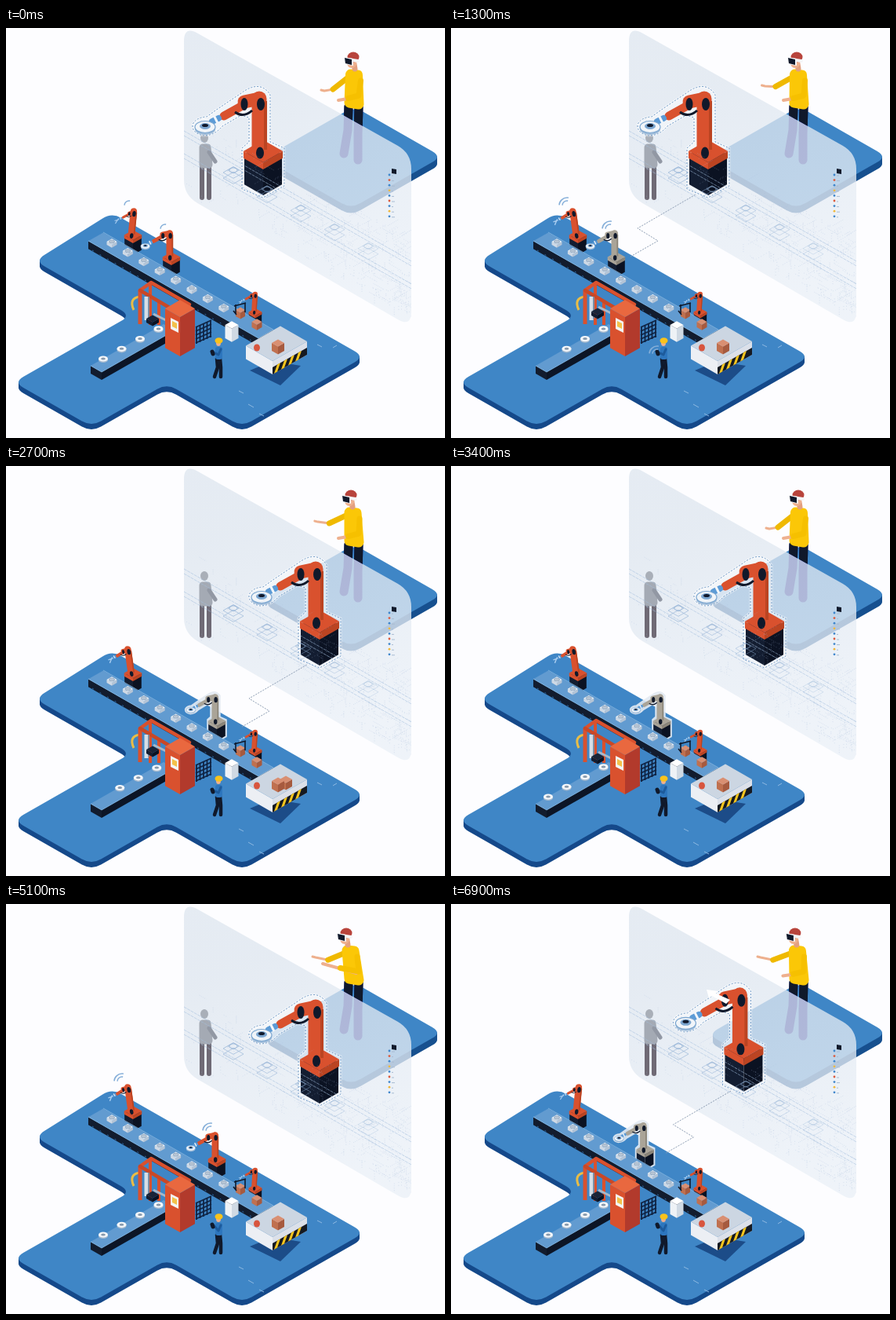
Animation, 560 px wide and 522 px high, one loop 7 s. Source, as an HTML page with a canvas:

```html
<!DOCTYPE html>
<html lang="en">
<head>
<meta charset="utf-8">
<title>Virtual factory</title>
<style>
html, body { margin: 0; height: 100%; overflow: hidden; background: #fdfdff; }
canvas { display: block; }
</style>
</head>
<body>
<canvas id="stage" width="560" height="522"></canvas>
<script>
const c = document.getElementById('stage').getContext('2d');
const LOOP = 7000, STEP = 100, CYCLE = 1750, K = .57; // K: slope of the isometric axes
const RED = '#d9512e', DARK = '#10192b', BLUE = '#3f86c6', WIRE = '#8fafd3', SKIN = '#eeb08e', YELLOW = '#fbc707';
// Face colours: top, left, right.
const WHITE = ['#f0f4f8', '#cfd9e5', '#b4c4d6'], CARTON = ['#d98f72', '#c0704f', '#a65a3f'];
const STEEL = ['#629bd0', '#121c2e', '#0c1526'], BASE = ['#1a2438', '#131d31', '#0b1222'];
const CABINET = ['#e9683f', RED, '#b23a2c'], TRAY = ['#ccd6e2', '#eceff4', '#dbe0e9'];

const clamp = v => Math.max(0, Math.min(1, v));
const ease = (v, a, b) => { v = clamp((v - a) / (b - a)); return v * v * (3 - 2 * v); };
const mix = (a, b, k) => a + (b - a) * k;

function fill(path, color) { c.fillStyle = color; c.fill(path); }
function poly(points, color) { fill(new Path2D('M' + points + 'Z'), color); }
function line(path, color, w = 1, dash = []) {
  c.strokeStyle = color; c.lineWidth = w; c.setLineDash(dash);
  c.stroke(typeof path === 'string' ? new Path2D(path) : path);
  c.setLineDash([]);
}
function limb(points, color, w) {
  c.lineCap = c.lineJoin = 'round';
  line('M' + points, color, w);
  c.lineCap = 'butt'; c.lineJoin = 'miter';
}
function oval(x, y, rx, ry, color, stroke, w = 1) {
  c.beginPath(); c.ellipse(x, y, rx, ry, 0, 0, 7);
  if (color) { c.fillStyle = color; c.fill(); }
  if (stroke) { c.strokeStyle = stroke; c.lineWidth = w; c.stroke(); }
}
function at(x, y, draw) { c.save(); c.translate(x, y); draw(); c.restore(); }

// Polygon whose corners are rounded off over the given distance.
function rounded(points, cut) {
  const path = new Path2D(), n = points.length;
  const toward = ([x, y], [u, v]) => {
    const k = cut / Math.hypot(u - x, v - y);
    return [mix(x, u, k), mix(y, v, k)];
  };
  points.forEach((p, i) => {
    path.lineTo(...toward(p, points[(i + n - 1) % n]));
    path.quadraticCurveTo(...p, ...toward(p, points[(i + 1) % n]));
  });
  path.closePath();
  return path;
}
// Slab outline walks in turn along the right-down and left-down axes.
function slab(x, y, walk, h, side) {
  const corners = [[x, y]];
  walk.forEach((d, i) => { x += i % 2 ? -d : d; y += d * K; corners.push([x, y]); });
  const path = rounded(corners, 14);
  for (let i = h; i > 0; i--) at(0, i, () => fill(path, side));
  fill(path, BLUE);
}
// Isometric block from its nearest bottom corner: a to the right, b to the left, h up.
function block(x, y, a, b, h, [top, left, right]) {
  const p = (u, v, z) => `${x + u - v},${y - (u + v) * K - z} `;
  poly(p(0, 0, 0) + p(0, b, 0) + p(0, b, h) + p(0, 0, h), left);
  poly(p(0, 0, 0) + p(a, 0, 0) + p(a, 0, h) + p(0, 0, h), right);
  poly(p(0, 0, h) + p(a, 0, h) + p(a, b, h) + p(0, b, h), top);
}
const box = (x, y, a, h, colors) => block(x, y + a * K + h, a, a, h, colors);

function wireBox(x, y) {
  for (const [size, dy] of [[13, 0], [13, 7], [7, -3]]) {
    const b = size * K;
    line(`M${x - size},${y + dy}l${size},${-b} ${size},${b} ${-size},${b}Z`, WIRE, .8);
  }
  oval(x, y - 3, 5, 3, 0, WIRE, .8);
}
function wifi(x, y, count) {
  for (let i = 0; i < count; i++) {
    c.beginPath(); c.arc(x, y, 6 + 4 * i, 3.2, 4.9);
    c.strokeStyle = '#86afd9'; c.lineWidth = 1.6; c.stroke();
  }
}

const SILHOUETTE = new Path2D('M-27,-6V-58L-18,-66V-97L-28,-100-52,-86Q-62,-74-76,-74Q-91,-77-90,-88' +
  'Q-86,-97-72,-98L-58,-108-28,-128Q-4,-146 9,-126V-66L27,-58V-10L0,5Z');

function arm(x, y, s, { body = RED, lean = 0, reach = 1, disc = true, halo, dashed } = {}) {
  const shade = body === RED ? '#bb4422' : '#8b8579';
  c.save(); c.translate(x, y); c.scale(s, s);
  if (halo) { fill(SILHOUETTE, halo); line(SILHOUETTE, halo, 3); }
  if (dashed) line(SILHOUETTE, '#6d97c4', 1, [2, 2]);
  block(0, 2, 24, 24, 38, BASE);
  block(0, -31, 25, 25, 9, [body, body, shade]);
  c.transform(1, 0, lean, 1, lean * 52, 0);
  limb('-5,-54 -5,-121', body, 19);
  line('M3,-56V-118', shade, 4);
  oval(-4, -52, 5, 7.5, DARK);
  at(-3, -114, () => {
    c.scale(reach, reach);
    limb('-2,-7 -21,-3', body, 17);
    limb('-20,0 -47,15', body, 11);
    line('M-33,10Q-22,18-11,8', DARK, 3);
    oval(-21, 0, 4.5, 8, DARK);
    limb('-54,18 -62,22', '#5c9bd6', 8);
    line('M-60,14L-55,24', '#f2f6fa', 3);
    if (disc) {
      oval(-71, 32, 13, 7, '#9fbcd9');
      oval(-71, 29, 13, 7.5, '#f1f5f9', '#7ba6d0', 1.2);
      oval(-71, 28, 7, 4, '#7ba6d0');
      oval(-71, 27, 4, 2, DARK);
    } else line('M-64,24l-18,6M-66,20l-12,22', '#a9cdf0', 4);
  });
  oval(-3, -114, 5, 8, DARK);
  c.restore();
}

const SCREEN = rounded([[227, -3], [517, 159.5], [517, 381], [227, 213]], 20);

function legs(color) {
  limb('437,100 436,130 431,160', color, 11);
  limb('450,100 449,135 449,168', color, 11);
}
function operator(t) {
  const point = ease(t, 600, 2000) - ease(t, 2400, 3300) + ease(t, 4300, 5100);
  const lift = ease(t, 4300, 5100) - ease(t, 5200, 7100);
  const hx = 402 - 11 * point, hy = 80 - 12 * point, gx = 424 - 20 * lift, gy = 92 - 16 * lift;
  const d = 1 - 4 * point - 5 * lift;
  const ex = mix(438, hx, .58), ey = mix(66, hy, .58) + 4;
  limb(`${ex},${ey} ${hx + 4},${hy} ${hx},${hy - 1}`, SKIN, 3);
  limb(`${437 + d / 2},62 ${ex},${ey}`, '#efb900', 7);
  limb(`${439 + d / 2},59 438,95 450,97 ${448 + d / 2},60Z`, YELLOW, 13);
  c.fillStyle = YELLOW; c.fillRect(436, 60, 14, 38);
  limb(`447,88 ${gx},${gy}`, SKIN, 4);
  limb(`${452 + d / 2},67 450,86 ${mix(449, gx, .5)},${mix(87, gy, .5)}`, '#f6c000', 7);
  at(d, 0, () => {
    limb('443,46 444,52', '#e3a07f', 7);
    oval(440, 43, 6.5, 8, SKIN);
    oval(442, 37, 7.5, 6.5, '#b8443c');
    limb('435,40 448,42', '#f5f6f8', 4);
    poly('430,37 442,39 442,48 431,46', '#f5f6f8');
    poly('431,38 440,40 440,47 432,45', DARK);
  });
}

function wireframe(t, moved) {
  c.save(); c.clip(SCREEN);
  let seed = 7;
  const random = () => (seed = seed * 16807 % 2147483647) / 2147483647;
  c.globalAlpha = .4;
  for (let i = 0; i < 330; i++) {
    const u = Math.sqrt(random()), x = 228 + 288 * u, y = 130 + 163 * u + (random() - .25) * 100;
    const n = 3 + random() * 14, axis = Math.floor(random() * 3);
    line(`M${x},${y}l${axis === 2 ? 0 : n},${[K, -K, .7][axis] * n}`, '#a3bbd8', .8, [1, 1 + random() * 2]);
  }
  c.globalAlpha = .7;
  for (const y of [131, 137, 160, 166]) line(`M227,${y}l292,167`, '#a3bfdd', .8, [4, 1]);
  for (let k = 0; k < 5; k++) {
    c.globalAlpha = .75 - .1 * k;
    wireBox(290 + 43 * (k + moved % 1), 184 + 24.2 * (k + moved % 1));
  }
  c.restore();

  poly('492,179 498,180 498,186 492,185', DARK);
  for (let k = 0; k < 9; k++) {
    const y = 187 + k * 6.6;
    oval(489, y, 1.4, 1.4, ['#3f86cc', '#dc5a3b', '#3f86cc', '#f0b83d'][k % 4]);
    line(`M492,${y + 1}h${2 + (k + Math.floor(t / 300)) % 3}`, '#a9bcd3', 1);
  }
}

function virtualView(t, m, moved) {
  slab(444, 100, [112, 116, -112], 9, '#17508f');
  legs('#000d82');
  const g = c.createLinearGradient(300, 80, 400, 350);
  g.addColorStop(0, 'rgba(222,230,239,.77)');
  g.addColorStop(1, 'rgba(234,240,247,.77)');
  fill(SCREEN, g);
  c.save();
  c.clip(new Path2D('M227,-3L517,159.5V-3Z'));
  legs(DARK);
  c.restore();

  for (const x of [250, 259]) limb(`${x},178 ${x},216`, '#6f6a75', 6);
  limb('251,152 251,174 259,174 257,152Z', '#a4aab4', 9);
  limb('259,158 267,170', '#9298a4', 5);
  oval(253, 140, 5, 6, '#a9afb8');

  arm(328 + 72 * m, 211 + 41 * m, 1, { halo: '#ffffff66', dashed: true });
  const forward = t >= 1500 && t < 2500;
  if (forward || t >= 5800) at(341, 118, () => {
    if (forward) c.rotate(Math.PI);
    poly('-15,-9 0,-7 -3,-4 15,4 10,9 -8,-1 -12,2', '#fff');
  });
  wireframe(t, moved);
  operator(t);
}

function press(p) {
  const lift = 9 * (ease(p, 0, .12) - ease(p, .78, .9));
  line('M171,342Q156,344 163,359', '#e9bd46', 3);
  for (const [x, y, w] of [[184, 324, 4], [171, 334, 5], [195, 348, 4]]) line(`M${x},${y}v${382 - y - w}`, RED, w);
  limb('171,334 185,324 234,352', RED, 4.5);
  limb('171,334 212,358', '#c94827', 4.5);
  line('M179,342V372', '#d5dee7', 5);
  line('M182,342V370', '#7c8ea4', 2);
  box(187, 370 - lift, 8, 5, BASE);
  line(`M188,${364 - lift}l16,8`, '#a8b8c8', 3);
  block(222, 418, 19, 19, 50, CABINET);
  poly('210,369 220,374 220,388 210,383', '#f3f6f8');
  poly('212,373 218,376 218,383 212,380', '#f3c14b');
  for (let i = 0; i < 5; i++) line(`M${243 + i * 4.5},${380 - i * 2}v22M242,${381 + i * 5}l20,-9`, '#102444', 1.8);
}

function cart(p) {
  poly('311,436 340,424 376,430 350,455', '#1c4c88');
  block(340, 441, 44, 34, 17, TRAY);
  if (p > .42 && p < .65) box(357, 399, 8, 9, CARTON);
  box(347, 401, 8, 10, CARTON);
  oval(320, 407, 4, 4.5, '#d8553e');
  const edge = (x, h) => `${x},${441 - (x - 340) * K - h} `;
  poly(edge(340, 0) + edge(384, 0) + edge(384, 9) + edge(340, 9), '#151a22');
  for (let x = 342; x < 378; x += 9) poly(edge(x, 0) + edge(x + 4, 0) + edge(x + 8, 9) + edge(x + 4, 9), '#f7c51e');
}

function engineer(t) {
  const raised = t > 4500 ? 4 : 0;
  limb('269,421 270,432 266,444', DARK, 4.5);
  limb('273,421 274,432 274,444', DARK, 4.5);
  limb('270,409 270,419 273,419 273,409Z', '#2d76be', 6);
  limb(`274,409 271,416 265,${413 - raised}`, '#1d5b9c', 3);
  limb(`263,${412 - raised} 264,${415 - raised}`, DARK, 5);
  oval(271, 401, 3, 4, SKIN);
  oval(271.5, 398, 5, 3.8, '#f9c31c');
  if (t > 900 && t < 1600) wifi(263, 415, 2);
}

function factory(t, m, p, moved) {
  slab(135, 235, [322, 156, -96, 96, -99, -149, -122], 7, '#15498a');
  line('M297,462l6,3M309,479l7,4M323,491l6,3M397,403l6,3M422,404l-5,3', '#8db9e2', 1);

  const swing = ease(t, 500, 1000) - ease(t, 5400, 5900);
  const selected = t >= 1000 && t < 4300 || t >= 5500;
  arm(162, 288, .45, { lean: mix(-.1, .14, swing), reach: mix(.65, .75, swing), disc: false });
  arm(318, 380, .34, { lean: -.06, reach: .75, disc: false });
  arm(211 + 58 * m, 316 + 33 * m, .45,
    { body: selected ? '#aaa498' : RED, halo: selected && t >= 1500 ? '#e4ebf3dd' : null });

  block(322, 405, 19, 217, 10, STEEL);
  line('M105,271l217,124 19,-11M124,260l217,124', '#86b6e0', .8);
  line('M110,283l212,120', '#2d6eb0', 1, [2, 9]);
  for (let k = 0; k < 8; k++) {
    const u = k + moved % 1, x = 135 + 20.4 * u, y = 272 + 11.8 * u;
    box(x, y, 6.5, 4, WHITE);
    oval(x, y, 3.6, 2.1, '#b7c5d4', '#8ba3bd', .8);
  }

  box(299, 359 + 4 * (moved % 1), 6, 8, CARTON);
  box(320 + 14 * (moved % 1), 374 + 8 * (moved % 1), 6.5, 7, CARTON);
  line('M291,354l15,-4M293,352v12M305,350v12M290,360l4,5', DARK, 1.6);

  block(122, 448, 93, 14, 10, STEEL);
  line('M108,430l14,8 93,-53', '#86b6e0', .8);
  const slide = ease(p, .3, .6);
  for (let k = p > .85 ? -1 : 0; k < (slide > .1 ? 3 : 4); k++) {
    const x = 124 + 23.5 * (k + slide), y = 421 - 12.7 * (k + slide);
    oval(x, y + 1.5, 6, 3.6, '#a9bccf');
    oval(x, y, 6, 3.6, '#f4f7fa');
    oval(x, y, 2.8, 1.5, '#8799ac');
  }
  press(p);
  box(288, 378, 8.5, 17, ['#ffffff', '#eef2f6', '#cfd9e3']);
  cart(p);
  engineer(t);

  if (t < 1500 || t >= 4300 && t < 5400) {
    const count = 1 + Math.floor(t / 700) % 2;
    wifi(157 - 9 * swing, 226, count);
    wifi(203 + 58 * m, 256 + 33 * m, count);
  }
}

function draw(now) {
  const t = Math.floor(now % LOOP / STEP) * STEP, p = t % CYCLE / CYCLE;
  const moved = ease(p, .02, .42), m = ease(t, 1600, 2450) - ease(t, 6550, 7400);
  c.fillStyle = '#fdfdff';
  c.fillRect(0, 0, 560, 522);
  virtualView(t, m, moved);
  factory(t, m, p, moved);
  if (t >= 1000 && t < 2900 || t >= 5600) at(72 * m, 41 * m, () =>
    line('M229,291L264,271 238,255 312,212', '#8d9db3', 1, [2, 1.5]));
  requestAnimationFrame(draw);
}
requestAnimationFrame(draw);
</script>
</body>
</html>
```
